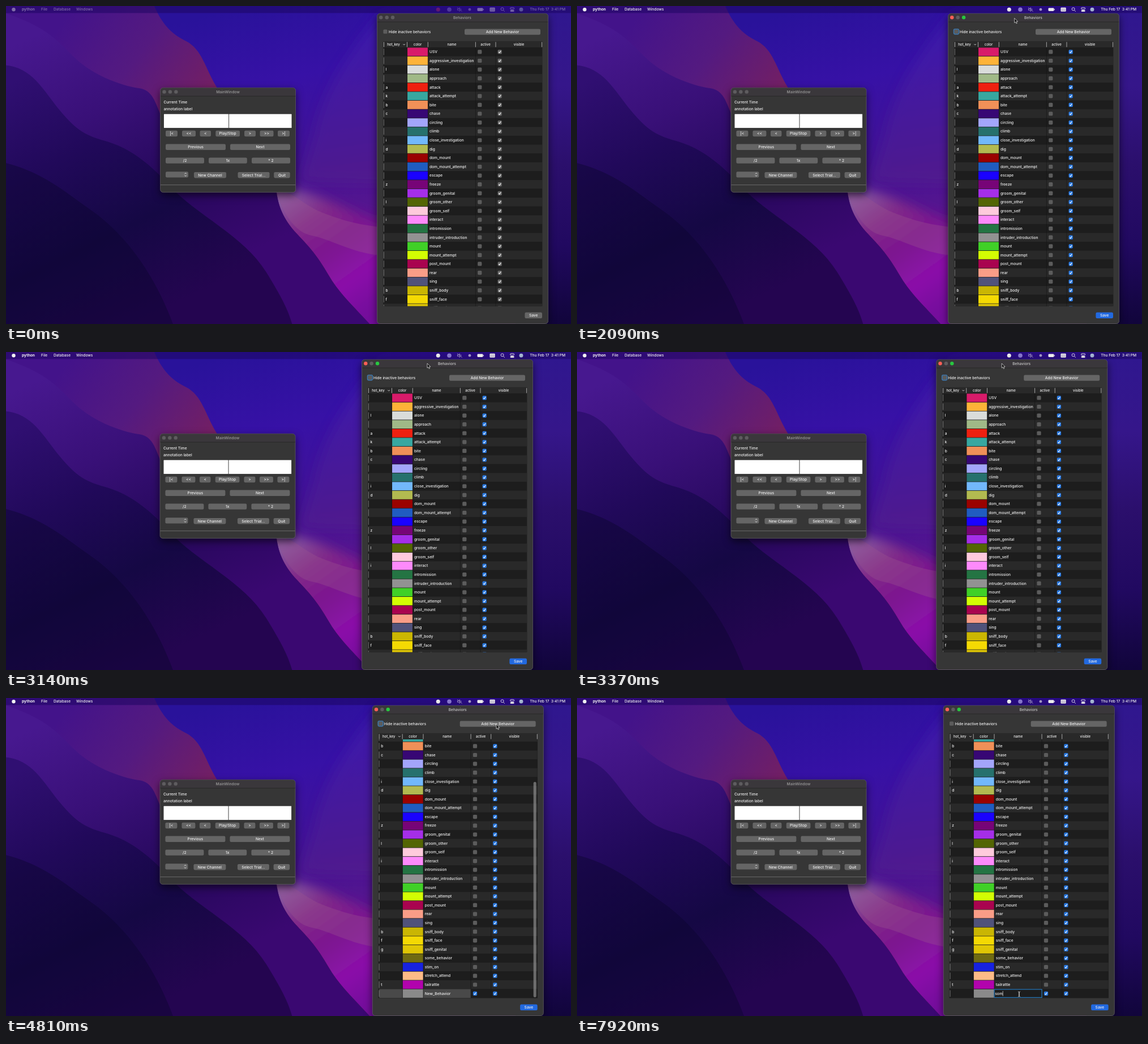
An HTML page for the animation above (8 s loop, 998 by 561 pixels).

```html
<!DOCTYPE html>
<html lang="en">
<head>
<meta charset="utf-8">
<title>Adding a behavior</title>
<style>
  html, body { margin: 0; width: 100%; height: 100%; overflow: hidden; background: #1e0650; }
  svg { display: block; width: 100vw; height: 100vh; }
  text { font: 500 6.65px Inter, "Open Sans", sans-serif; fill: #f2f2f2; white-space: pre; }
  .mid { text-anchor: middle; }
  .end { text-anchor: end; }
  .bold { font-weight: 700; }
  .head { font-size: 6.05px; }
  .title { font-weight: 600; fill: #929292; }
  .frame { fill: #363636; stroke: #67636a; stroke-width: .7; filter: drop-shadow(0 5px 7px #0009); }
  .bar { fill: #3a373b; }
  .light, .mini { fill: #5e5c5f; }
  .button { fill: #656565; }
  .box { fill: #5c5c5c; }
  .checked { fill: #666; }
  .tick { fill: none; stroke: #fff; stroke-width: 1.1; }
  .active .title { fill: #b8b8b8; }
  .active .red { fill: #ff5f57; }
  .active .yellow { fill: #febc2e; }
  .active .green { fill: #28c840; }
  .active .checked { fill: #2878e0; }
  .active .primary { fill: #2269df; }
  .pressed { fill: #858585; }
  .focus { fill: none; stroke: #3f78ad; stroke-width: 1.6; }
</style>
</head>
<body>
<svg id="stage" viewBox="0 0 998 561" xmlns="http://www.w3.org/2000/svg"></svg>
<script>
const LOOP = 8000, ROW = 15.586, TOP = 73.1;

const behaviors = `USV d81b6a|aggressive_investigation fdb338|alone d9dcda l|approach a0b987|attack ee2010 a
attack_attempt 38a7a0 k|bite f09058 b|chase 370774 c|circling a3a5fb|climb 26716d|close_investigation 72b8fb i
dig b2ba50 d|dom_mount 9a0200|dom_mount_attempt 205cc0|escape 1a02ff|freeze 770477 z|groom_genital a52ee8
groom_other 536503 l|groom_self fecadc|interact fd8afb i|intromission 247443|intruder_introduction 929292
mount 40d027|mount_attempt d3fd03|post_mount a9034f|rear f99d87|sing 50527a|sniff_body cab603 b|sniff_face f4d903 f
sniff_genital dfc605 g|some_behavior 6f6a12|stim_on 1722e0|stretch_attend fdbb87|tailrattle b203ad t|New_Behavior 8a8a8a`
  .split(/[|\n]/).map(line => line.split(" "));

const rect = (x, y, w, h, attrs = "") => `<rect x="${x}" y="${y}" width="${w}" height="${h}" ${attrs}/>`;
const circle = (x, y, r, attrs = "") => `<circle cx="${x}" cy="${y}" r="${r}" ${attrs}/>`;
const path = (d, attrs = "") => `<path d="${d}" ${attrs}/>`;
const text = (x, y, label, cls = "", attrs = "") =>
  `<text x="${x}" y="${y}" class="${cls}" ${attrs}>${label.replace(/</g, "&lt;")}</text>`;
const group = (attrs, ...parts) => `<g ${attrs}>${parts.join("")}</g>`;
const gradient = (id, [x1, y1, x2, y2], ...colors) =>
  `<linearGradient id="${id}" gradientUnits="userSpaceOnUse" x1="${x1}" y1="${y1}" x2="${x2}" y2="${y2}">` +
  colors.map((c, i) => `<stop offset="${i / (colors.length - 1)}" stop-color="${c}"/>`).join("") + "</linearGradient>";

const button = (x, right, y, label, cls = "", id = "") =>
  rect(x, y, right - x, 10.4, `rx="2.3" class="button ${cls}" id="${id}"`) +
  text((x + right) / 2, y + 7.6, label, "mid");
const checkbox = (x, y, on) =>
  rect(x - 3.6, y - 3.6, 7.2, 7.2, `rx="1.6" class="${on ? "checked" : "box"}"`) +
  (on ? path(`M${x - 1.9} ${y + .2}l1.4 1.6 2.4-3.6`, 'class="tick"') : "");
const lights = (x, y, colors) => colors.map((c, i) => circle(x + i * 10.4, y, 3.2, `class="light ${c}"`)).join("");

function wallpaper() {
  const valley = "L478 329C482 360 495 382 515 403S550 440 570 475S620 535 655 575H-9";
  return `<defs>
    ${gradient("sky", [420, 0, 560, 561], "#29129a", "#3711a6", "#421394", "#5b168e", "#5c0f88")}
    ${gradient("haze", [600, 20, 640, 330], "#3f1bb0", "#4a1d9c", "#54208a")}
    ${gradient("lit", [492, 330, 640, 540], "#8862a4", "#812a88", "#7c1490", "#8c11aa", "#730b9b")}
    ${gradient("far", [0, 0, 0, 561], "#2f178f", "#35168a", "#2b0f6c", "#210960", "#11053b")}
    ${gradient("red", [120, 0, 350, 170], "#43138a", "#541a80", "#741f63")}
    ${gradient("violet", [120, 20, 330, 480], "#47188f", "#391078", "#25085a", "#3a0871")}
    ${gradient("dark", [60, 110, 270, 540], "#300f72", "#21095a", "#150844", "#240550")}
    <filter id="soft"><feGaussianBlur stdDeviation="10"/></filter>
    <filter id="edge"><feGaussianBlur stdDeviation=".7"/></filter></defs>` +
    rect(0, 0, 998, 561, 'fill="url(#sky)"') +
    path("M665 10C600 90 560 150 545 225L520 310H998V10Z", 'fill="url(#haze)" opacity=".7" filter="url(#soft)"') +
    path("M465 322C535 318 580 355 660 378H900V580H465Z", 'fill="url(#lit)" filter="url(#soft)"') +
    rect(900, 0, 98, 561, 'fill="url(#far)"') +
    group('filter="url(#edge)"',
      path("M477 329C505 322 520 350 560 365S620 385 660 390V440C610 435 570 410 540 405S490 365 477 329Z", 'fill="#9a5590" opacity=".35"'),
      path(`M262 0C275 30 290 48 318 62S352 110 372 143${valley}V0Z`, 'fill="url(#red)"'),
      path(`M-9 10C70 35 90 60 120 90S200 140 235 145S262 190 300 240S440 300 478 329${valley}Z`, 'fill="url(#violet)"'),
      path("M-9 104C45 104 65 148 95 184S140 228 175 238S245 268 290 318S420 405 460 470S500 545 510 575H-9Z", 'fill="url(#dark)"'),
      path("M-9 275C60 290 100 325 150 360S260 460 300 575H-9Z", 'fill="#0c0630" opacity=".45"'));
}

function menuBar() {
  const white = 'fill="#f2f2f2"', line = 'fill="none" stroke="#f2f2f2" stroke-width=".9"';
  return rect(0, 0, 998, 12.4, 'fill="#1c0560" opacity=".52"') +
    group('id="menu"',
      circle(13.5, 6.2, 3.2, white),
      text(28, 8.4, "python", "bold"), text(62, 8.4, "File"), text(84, 8.4, "Database"), text(124, 8.4, "Windows"),
      text(988, 8.4, "Thu Feb 17  3:41 PM", "end"),
      rect(832.5, 3.5, 10, 5.4, `rx="1.4" ${white}`), path("M843.4 5v2.4", line),
      rect(854.5, 2.7, 9.2, 7, `rx="1" ${white}`), path("M856 5h6.2M856 7.4h6.2", 'stroke="#3a1a78" stroke-width=".8" stroke-dasharray="1 .7"'),
      circle(876.6, 5.4, 2.5, line), path("M878.5 7.4l2.3 2.4", line),
      rect(890.6, 2.8, 7, 3, `rx="1.5" ${line}`), rect(890.6, 6.9, 7, 3, `rx="1.5" ${white}`),
      circle(910, 6.2, 3.4, 'fill="#a7b9d5"')) +
    group('id="status"',
      circle(763.3, 6.2, 3.5, 'fill="#eee" id="cloud"'),
      circle(783, 6.2, 3.8, 'fill="#8a79cf"'),
      group('opacity=".62"',
        path("M797.5 5h1.6l2.3-2v6.4l-2.3-2h-1.6ZM797 2.7l8.6 7M803.2 4.4q1.5 1.8 0 3.6", line),
        circle(819, 6.2, 2.4, white)));
}

function mainWindow() {
  return group('id="main"',
    rect(272.6, 144.3, 239, 184.4, 'rx="5" class="frame"'),
    path("M273 159V149a4.5 4.5 0 0 1 4.5-4.4h229a4.5 4.5 0 0 1 4.5 4.4v10Z", 'class="bar"'),
    path("M273 159h238.5", 'stroke="#242424" stroke-width=".8"'),
    lights(279.5, 151.4, ["red", "yellow", "green"]),
    text(392, 153.6, "MainWindow", "mid title"),
    text(278.5, 171.5, "Current Time"), text(278.5, 184, "annotation label"),
    rect(278.7, 190.2, 226.2, 25.1, 'fill="#fff" stroke="#111" stroke-width=".5"'),
    path("M393.6 190.2v25", 'stroke="#111" stroke-width=".8"'),
    [[282, 303, "|<"], [311, 335, "<<"], [342.5, 362, "<"], [370.3, 413, "Play/Stop"], [421, 441, ">"],
      [448.5, 472.5, ">>"], [480, 501, ">|"]].map(([x, r, label]) => button(x, r, 219.8, label)).join(""),
    button(282, 388, 243.6, "Previous"), button(396, 502, 243.6, "Next"),
    button(282, 350, 267.4, "/2"), button(358, 425.8, 267.4, "1x"), button(434, 502, 267.4, "* 2"),
    button(282, 322, 292.2, ""), path("M315.5 296.3l1.7-1.7 1.7 1.7M315.5 298.6l1.7 1.7 1.7-1.7", 'fill="none" stroke="#eee" stroke-width=".9"'),
    button(332, 389, 293, "New Channel"), button(409.5, 465.5, 293, "Select Trial..."), button(473.2, 501.7, 293, "Quit"),
    path("M273 315.6h238.3", 'stroke="#777" stroke-width=".8"'));
}

function tableRow([name, color, key], i) {
  const y = TOP + i * ROW, middle = y + 7.8, isNew = i === behaviors.length - 1;
  return rect(666, y, 281, ROW, `fill="${i % 2 ? "#292929" : "#1d1d1d"}"`) +
    (isNew ? rect(667.5, y, 162, ROW, 'fill="#494949" id="selection"') : "") +
    rect(709, y + .4, 36.2, ROW - .8, `fill="#${color}"`) +
    path(`M667.4 ${y + 2}v${ROW - 4}`, 'stroke="#aaa" stroke-width=".6"') +
    path(`M708.6 ${y}v15.6M745.4 ${y}v15.6M829.4 ${y}v15.6M865 ${y}v15.6`, 'stroke="#151515" stroke-width=".6"') +
    text(670.6, middle + 2.3, key || "") + text(748, middle + 2.3, name, "", isNew ? 'id="newName"' : "") +
    checkbox(836.8, middle, isNew) + checkbox(872.2, middle, true);
}

function editor() {
  const y = TOP + (behaviors.length - 1) * ROW;
  return group('id="editor"',
    rect(745.4, y + .5, 84, ROW - 1.2, 'fill="#1d1d1d" stroke="#2574b4" stroke-width="1.3"'),
    rect(746.6, y + 2.8, 47, 10, 'fill="#3f638b" id="highlight"'),
    text(746.6, y + 10.1, "", "", 'id="typed"'),
    path(`M0 ${y + 3.4}v9`, 'stroke="#eee" stroke-width=".7" id="caret"'));
}

function behaviorsWindow() {
  const heads = [["hot_key", 684.5], ["color", 727], ["name", 787.5], ["active", 847], ["visible", 906]];
  return group('id="behaviors"',
    rect(655.6, 13.3, 302, 547.2, 'rx="5" class="frame"'),
    path("M656 28V18a4.5 4.5 0 0 1 4.5-4.4h292a4.5 4.5 0 0 1 4.5 4.4v10Z", 'class="bar"'),
    path("M656 28h301.3", 'stroke="#242424" stroke-width=".8"'),
    lights(662.3, 20.2, ["red", "mini", "green"]),
    text(806, 22.6, "Behaviors", "mid title"),
    checkbox(670, 45.2), rect(665.6, 40.8, 8.8, 8.8, 'rx="2" class="focus" id="focus"'),
    text(676, 47.7, "Hide inactive behaviors"),
    button(810, 944, 40.4, "Add New Behavior", "", "add"),
    rect(666, 62, 281.3, 467.4, 'fill="#1d1d1d"'), rect(666, 62, 281.3, 11, 'fill="#292929"'),
    heads.map(([label, x]) => text(x, 70, label, "mid head")).join(""),
    path("M701.4 67l1.8 1.8 1.8-1.8", 'fill="none" stroke="#ddd" stroke-width=".9"'),
    path("M667.5 63.5v9M708.5 63.5v9M745.3 63.5v9M829.4 63.5v9M865 63.5v9M946.6 63.5v9", 'stroke="#ddd" stroke-width=".7"'),
    `<clipPath id="view">${rect(666, 73, 281.4, 456.4)}</clipPath>`,
    group('clip-path="url(#view)"',
      group('id="rows"', behaviors.map(tableRow).join(""), editor()),
      rect(940, 148, 5, 380, 'rx="2.5" fill="#aaa" id="thumb"')),
    button(916.4, 947, 540.6, "Save", "primary"));
}

const pointer = group('id="pointer"',
  path("M0 0V8.2L1.9 6.6 3.2 9.5 4.6 8.9 3.4 6H5.9Z", 'id="arrow" fill="#111" stroke="#eee" stroke-width=".7"'),
  group('id="beam" fill="none"',
    ...[["#111", 1.8], ["#eee", .8]].map(([c, w]) => path("M-2-4.5Q0-4.5 0-3V3Q0 4.5-2 4.5M2-4.5Q0-4.5 0-3V3Q0 4.5 2 4.5", `stroke="${c}" stroke-width="${w}"`))));

stage.innerHTML = wallpaper() + menuBar() + mainWindow() + behaviorsWindow() + pointer;
const el = id => document.getElementById(id);

// Each move: start, end, number of steps, x, y, easing power.
const pointerMoves = [
  [120, 190, 2, 125, 207], [350, 430, 2, 420, 97], [510, 510, 1, 521, 106],
  [670, 990, 5, 474.5, 152.5], [1140, 1140, 1, 473, 154], [1380, 1530, 3, 782, 27.5],
  [1690, 1690, 1, 779.5, 27], [1850, 2160, 5, 771, 20], [2910, 3140, 4, 744, 20, 1.7],
  [3300, 3450, 3, 762.7, 20], [3700, 3850, 3, 872.5, 39.5], [4090, 4170, 2, 866.5, 46],
  [4410, 4490, 2, 866, 46.3], [5140, 5300, 3, 838, 380], [5460, 5620, 3, 781, 520], [5870, 5950, 2, 781, 522.5]];
const windowMoves = [[2910, 3140, 4, -27, 0, 1.7], [3300, 3450, 3, -8.3, 0]];

function position(t, x, y, moves) {
  for (const [start, end, steps, toX, toY, power = 1] of moves) {
    if (t < start) break;
    const progress = end > start ? (t + 1 - start) / (end - start) : 1;
    const step = Math.min(steps, Math.floor(progress * (steps - 1)) + 1);
    const part = (step / steps) ** power;
    x += (toX - x) * part;
    y += (toY - y) * part;
  }
  return [x, y];
}

const show = (id, on) => el(id).setAttribute("visibility", on ? "visible" : "hidden");
const move = (id, x, y) => el(id).setAttribute("transform", `translate(${x} ${y})`);
const fade = (id, opacity) => el(id).setAttribute("opacity", opacity);
// Latest value whose time has come.
const latest = (t, ...keys) => keys.filter(([time]) => t >= time).pop()[1];

function draw(t) {
  el("main").classList.toggle("active", t >= 1140 && t < 1850);
  el("behaviors").classList.toggle("active", t >= 1850);
  el("add").classList.toggle("pressed", t >= 4650 && t < 4810);
  move("main", t < 1140 ? 0 : -.6, 0);
  move("behaviors", ...position(t, 0, 0, windowMoves));
  move("rows", 0, t < 4730 ? 0 : -89.5);
  move("pointer", ...position(t, 80, 192, pointerMoves));

  fade("menu", latest(t, [0, .42], [1140, .75], [1180, 1]));
  fade("status", latest(t, [0, .42], [1220, 1]));
  el("cloud").setAttribute("fill", t < 1220 ? "#b82f68" : "#eee");
  fade("thumb", latest(t, [0, 0], [4730, .55], [5460, .35], [5540, .15], [5620, 0]));

  const editing = t >= 6610, selected = editing && t < 7690;
  show("pointer", t >= 120);
  show("arrow", t >= 120 && t < 6770);
  show("beam", t >= 6770);
  show("focus", t >= 1850 && t < 6530);
  show("selection", t < 6530);
  show("newName", !editing);
  show("editor", editing);
  show("highlight", selected);
  show("caret", editing && !selected);

  const typed = el("typed"), value = latest(t, [0, "New_Behavior"], [7690, "s"], [7760, "so"], [7920, "som"]);
  if (typed.textContent !== value) typed.textContent = value;
  const width = typed.getComputedTextLength();
  el("highlight").setAttribute("width", width);
  move("caret", 747 + width, 0);
}

const began = performance.now();
function tick() {
  draw((performance.now() - began) % LOOP);
  requestAnimationFrame(tick);
}
tick();
</script>
</body>
</html>
```
